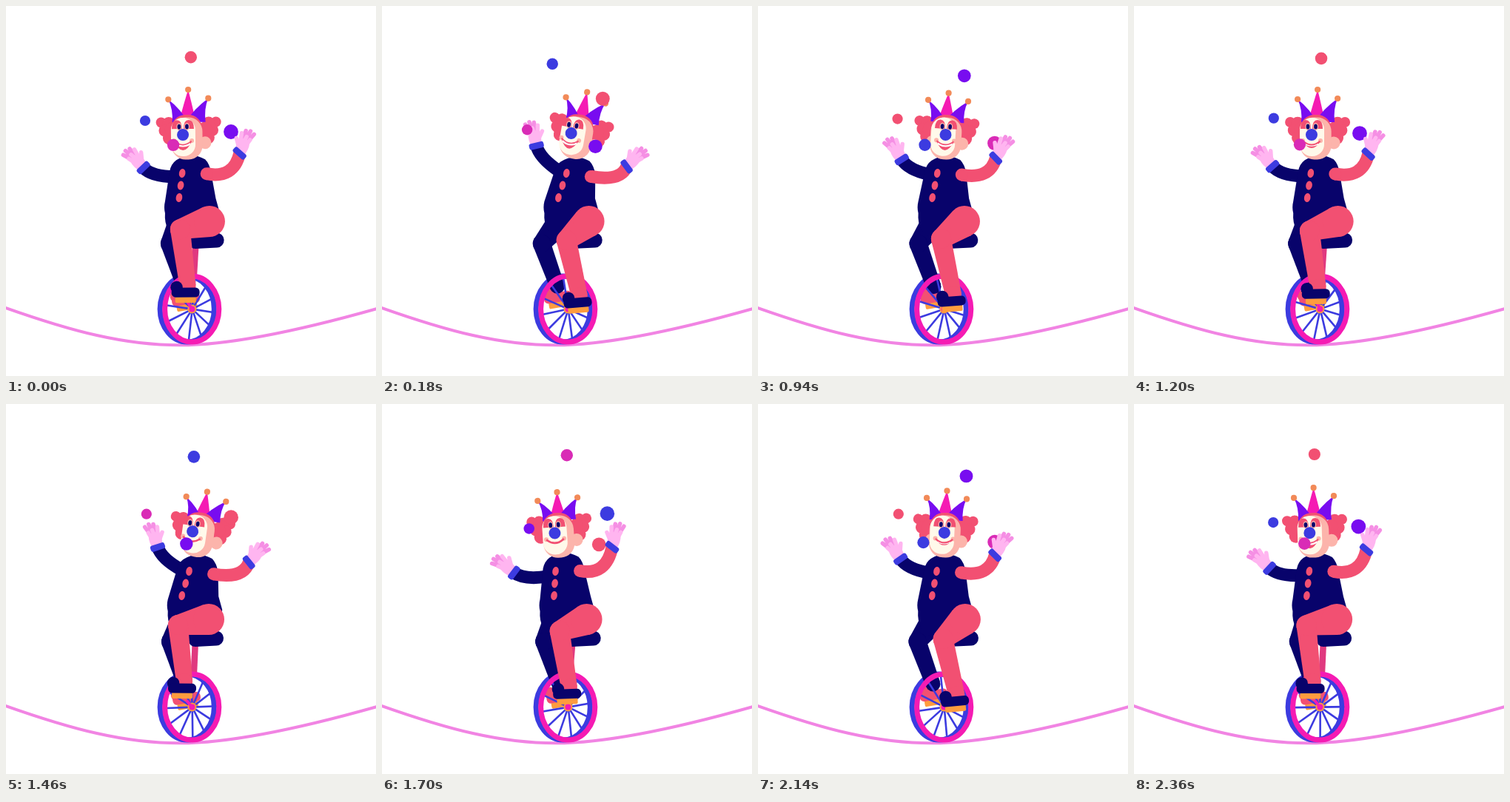
An HTML page for the animation above (2.38 s loop, 500x500 px).

```html
<!DOCTYPE html>
<html>
<head>
<meta charset="utf-8">
<style>
html, body { margin: 0; width: 100%; height: 100%; overflow: hidden; background: #fff; }
svg { display: block; width: 100vw; height: 100vh; }
</style>
</head>
<body>
<svg viewBox="0 0 500 500"><g id="stage"></g></svg>
<script>
// Two juggling cycles per loop; the body sways twice and the pedals rock four times in each.
const LOOP = 2380, CYCLE = LOOP / 2, SWAY = CYCLE / 2, PEDAL = CYCLE / 4;
const navy = '#08036b', coral = '#f25072', pink = '#f51bb3', blue = '#3c3be0',
  violet = '#780cf0', orange = '#ff9c3e', tipCol = '#f28a58', skin = '#fcb4ab',
  cream = '#fff9ea', palm = '#ffb5f0', finger = '#f58fe4', berry = '#d92bb6';

const n = v => v.toFixed(2);
const pt = p => n(p[0]) + ' ' + n(p[1]);
const rad = a => a * Math.PI / 180;
const wave = (t, period, peak) => Math.cos(2 * Math.PI * (t - peak) / period);

function oval(x, y, rx, ry, c, more = '') {
  return `<ellipse cx="${n(x)}" cy="${n(y)}" rx="${n(rx)}" ry="${n(ry)}" fill="${c}" ${more}/>`;
}
function dot(x, y, r, c) { return oval(x, y, r, r, c); }
function box(x, y, w, h, r, c) {
  return `<rect x="${n(x)}" y="${n(y)}" width="${w}" height="${h}" rx="${r}" fill="${c}"/>`;
}
function shape(d, c) { return `<path d="${d}" fill="${c}"/>`; }
function line(d, c, w, cap = 'round') {
  return `<path d="${d}" fill="none" stroke="${c}" stroke-width="${w}" stroke-linecap="${cap}"/>`;
}
function group([x, y], a, inner, flip = 1) {
  return `<g transform="translate(${n(x)} ${n(y)}) rotate(${n(a)}) scale(${flip} 1)">${inner}</g>`;
}
// A point given in the turned frame of another.
function turned([x, y], a, px, py) {
  const c = Math.cos(rad(a)), s = Math.sin(rad(a));
  return [x + px * c - py * s, y + px * s + py * c];
}

// Limb segment: the hull of two circles.
function limb(p, r, q, s, c) {
  const a = Math.atan2(q[1] - p[1], q[0] - p[0]);
  const o = Math.acos((r - s) / Math.hypot(q[0] - p[0], q[1] - p[1]));
  const on = (m, k, b) => pt([m[0] + k * Math.cos(b), m[1] + k * Math.sin(b)]);
  return shape(`M${on(p, r, a + o)}L${on(q, s, a + o)}L${on(q, s, a - o)}L${on(p, r, a - o)}Z`, c) +
    dot(...p, r, c) + dot(...q, s, c);
}
function shoe(p, a, c) {
  return group(p, a, box(-2, 12, 28, 9, 2, orange) + dot(0, 0, 8.3, c) + box(-7, 0.5, 38, 13, 5.5, c));
}
function hand(p, a, flip) {
  return group(p, a,
    line('M-3 -16L-8 -31M0 -16L-2 -33M3 -16L4 -31', finger, 5.5) +
    line('M-4 -14L-6 -22M1 -14L0 -24M5 -14L8 -26M5 -8L12 -17', palm, 5.5) +
    shape('M-6 2L6 2Q11 -11 7 -18Q0 -23 -7 -18Q-10 -9 -6 2Z', palm), flip);
}
const cuff = (p, a) => group(p, a, box(-10, -4, 20, 8.5, 3, blue));

// Upward arc, across to the far hand, then back along the chest.
const lane = [[188, 155], [217, 100], [244, 68], [282, 98], [303, 138],
  [304, 170], [318, 188], [255, 189], [223, 187], [205, 172]];
function ball(t, color) {
  const s = (t / CYCLE % 1 + 1) % 1 * lane.length, i = Math.floor(s), u = s - i;
  const [x, y] = [0, 1].map(k => {
    const [a, b, c, d] = [9, 0, 1, 2].map(j => lane[(i + j) % lane.length][k]);
    return b + u / 2 * (c - a + u * (2 * a - 5 * b + 4 * c - d + u * (3 * (b - c) + d - a)));
  });
  return dot(x, y, 8.5 - 1.4 * wave(t, CYCLE, 0), color);
}

function ring(x, y, c) {
  return oval(x, y, 36.6, 44.5, 'none', `stroke="${c}" stroke-width="7"`);
}
function spokes(x, y, spin) {
  let d = '';
  for (let k = 0; k < 12; k++) {
    const a = rad(spin + 30 * k);
    d += `M${n(x + 4)} ${n(y)}L${n(x + 3.5 + 34 * Math.cos(a))} ${n(y + 41.5 * Math.sin(a))}`;
  }
  return line(d, blue, 2.6);
}

function torso([x, y], l, r) {
  const d = `M${n(x - 19)} ${n(y + 5)}Q${n(x)} ${n(y - 7)} ${n(x + 20)} ${n(y + 4)}` +
    `Q${n(x + 26)} ${n(y + 10)} ${n(x + 28)} ${n(y + 22)}L${n(r)} 260L${n(r + 5)} 278L${n(r + 3)} 292` +
    `L270 318L246 318Q${n(l + 14)} 316 ${n(l + 5)} 302Q${n(l)} 292 ${n(l + 1)} 280` +
    `Q${n(l - 1)} 272 ${n(l + 1)} 264L${n(x - 28)} ${n(y + 20)}Q${n(x - 26)} ${n(y + 10)} ${n(x - 19)} ${n(y + 5)}Z`;
  const button = k => group([x - 11 + (l - x + 31) * k, 226 + 33 * k], 10, oval(0, 0, 4.3, 6, coral));
  return shape(d, navy) + [0, 0.5, 1].map(button).join('');
}

function prong(from, to, x, y, bend, c) {
  const side = (b, k) => `${n((b + x) / 2 + k)} ${n((y - 18) / 2)}`;
  return shape(`M${from} -14Q${side(from, bend)} ${x} ${n(y)}Q${side(to, bend)} ${to} -14Z`, c) + dot(x, y, 4.1, tipCol);
}
function curls(side) {
  return dot(side * 37, -14, 7, coral) + dot(side * 27, -13, 8.3, coral) + dot(side * 32, -3, 8.3, coral) +
    dot(side * 26, 7, 9, coral) + dot(side * 22, -4, 10, coral);
}
// d: how far the face is turned, grin: how open the mouth is, lift: stretch of the hat.
function head(d, grin, lift) {
  const skull = 0.3 * d, mask = 0.5 * d - 4;
  const patch = k => shape(`M${n(k - 7)} -5Q${n(k - 7)} -17 ${n(k)} -17Q${n(k + 7)} -17 ${n(k + 7)} -5Z`, coral);
  const eye = k => oval(k, -8, 3.6, 5, skin) + oval(k, -8, 2.4, 3.5, navy);
  return curls(-1) + curls(1) +
    prong(-13, 10, 0, -52 - lift, 0, pink) +
    prong(-22, -1, -27, -42 - lift / 2, 4, violet) +
    prong(-4, 23, 27, -43 - lift / 2, -4, violet) +
    dot(-19 - 0.5 * d, 13, 8, skin) + dot(22, 14, 8.5, skin) +
    box(skull - 21, -24, 42, 46, 19, coral) + box(skull - 21, -20.5, 42, 57, 19, skin) +
    box(mask - 16, -20, 33, 52, 16, cream) +
    patch(d - 8) + patch(d + 8) + eye(d - 5) + eye(d + 5.5) +
    dot(d - 12, 11, 3, skin) + dot(d + 12, 11, 3, skin) +
    group([d, 14], 0,
      shape(`M-12 -2Q0 ${n(5 + 17 * grin)} 12 -2Q0 6 -12 -2Z`, coral) +
      (grin > 0.2 ? line('M-8 1.5Q0 5.5 8 1.5', '#fff', n(4 * grin)) : '') +
      line('M-11 -2Q0 7 11 -2', coral, n(2.6 - grin))) +
    dot(d, 3, 8, blue);
}

function scene(t) {
  const s = wave(t, SWAY, 200), p = wave(t, PEDAL, 117);
  const look = wave(t, CYCLE, 835), smile = wave(t, LOOP, 1690), stretch = wave(t, CYCLE, 0);

  const wx = 247.7, wy = 409.6, hub = [wx + 3.7, wy];
  const foot = [247 + 21 * p, 391.5 + 14.5 * p], tilt = -4 - 4.5 * p;
  const knee = [246 + 13.5 * p, 313 + 14.5 * p], hip = [278.5 + 4.5 * p, 291];
  const farFoot = [226 - 5 * p, 389.5 - 3.5 * p], farKnee = [217 - 5 * p, 321];
  const seat = 287 + 3 * p;
  const sole = turned(foot, tilt, 12, 16);
  const reach = Math.atan2(sole[1] - hub[1], sole[0] - hub[0]);
  const pedal = [hub[0] + 10 * Math.cos(reach), hub[1] + 10 * Math.sin(reach)];

  const neck = [253 + 7.5 * s, 204 + 1.5 * s], left = 215.5 + 3 * s, right = 285 + 3 * s;
  const armL = [neck[0] - 21, 228 - 5 * s], cuffL = [193.5 + 15.5 * s, 208 - 20 * s], turnL = -33 + 20 * s;
  const armR = [neck[0] + 22, 228 + 2.5 * s], cuffR = [321 + 10 * s, 205 + 12 * s], turnR = 31 + 16 * s;
  const bendL = turned(cuffL, turnL, 0, 17), bendR = [cuffR[0] - 8, armR[1] + 7];

  return line('M-3 407C90 440 160 458.3 235 458.3C310 458.3 420 432 503 408.5', '#f184e3', 4) +
    ring(wx - 3, wy, blue) +
    shoe(farFoot, -10, coral) +
    limb([left + 24, 290], 18, farKnee, 12, navy) +
    limb(farKnee, 12, [farFoot[0] + 12, farFoot[1] - 10], 10, navy) +
    spokes(wx, wy, 40 + 42 * p) +
    line(`M${n(seat - 28)} 318L${n(hub[0] + 2.5)} 364`, '#e0397f', 8.5, 'butt') +
    ring(wx + 3.5, wy, pink) +
    dot(...hub, 6, orange) + dot(...hub, 4, pink) + line(`M${pt(hub)}L${pt(pedal)}`, pink, 4) +
    line(`M256 318L${n(seat)} 316.5`, navy, 20) +
    line(`M${pt(armL)}Q${pt(bendL)} ${pt(cuffL)}`, navy, 17, 'butt') +
    hand(cuffL, turnL, 1) + cuff(cuffL, turnL) +
    torso(neck, left, right) +
    limb(hip, 21, knee, 13.5, coral) +
    limb(knee, 13.5, turned(foot, tilt, 15, -2), 11, coral) +
    shoe(foot, tilt, navy) +
    group([254 + 14 * s, 171], 3 + 7 * s,
      head(6 * look - 6, 1 - Math.min(1, 1.3 * Math.max(0, smile)), 6 * Math.max(0, stretch))) +
    line(`M${pt(armR)}Q${pt(bendR)} ${pt(cuffR)}`, coral, 17, 'butt') + dot(...armR, 8.5, coral) +
    // Each ball follows a quarter cycle behind the next, some thrown a little early or late.
    ball(t, blue) + ball(t + CYCLE / 4 - 40, coral) +
    ball(t + CYCLE / 2, violet) + ball(t + CYCLE * 3 / 4 + 45, berry) +
    hand(cuffR, turnR, -1) + cuff(cuffR, 30 + turnR / 2);
}

const stage = document.getElementById('stage');
const start = performance.now();
function draw(now) {
  const t = Math.max(0, now - start) % LOOP;
  stage.innerHTML = scene(Math.floor(t / 20) * 20);
  requestAnimationFrame(draw);
}
draw(start);
</script>
</body>
</html>
```
